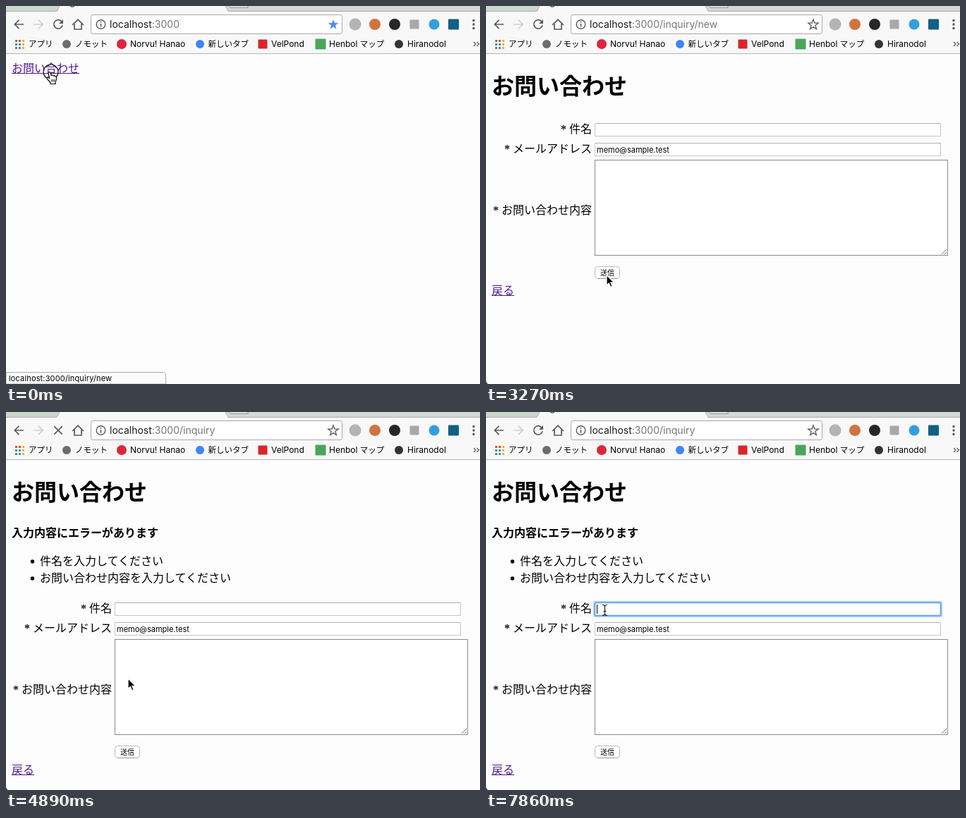
An HTML page that plays this animation: 672 px wide and 536 px high, repeating every 8 s.

```html
<!DOCTYPE html>
<html lang="ja">
<head>
<meta charset="utf-8">
<title>お問い合わせ</title>
<style>
html, body { margin: 0; width: 100%; height: 100%; overflow: hidden; background: #fdfdfd; }
svg { position: absolute; left: 0; top: 0; display: block; }
text { white-space: pre; }
.ui { font-family: Inter, Roboto, "Noto Sans CJK JP", "Noto Sans CJK", sans-serif; }
.url { font-size: 14px; fill: #757575; }
.mark { font-size: 12px; fill: #000; }
.kana { font-size: 11.5px; }
.small { font-size: 11px; fill: #000; }
.jp { font-family: "Noto Sans CJK JP", "Noto Sans CJK", sans-serif; font-size: 16px; }
.link { fill: #551a8b; }
.star { font-family: "Liberation Serif", serif; font-weight: bold; }
</style>
</head>
<body>
<svg width="672" height="536" viewBox="0 0 672 536">
  <rect width="672" height="536" fill="#fdfdfd"/>

  <!-- page: start -->
  <g id="home">
    <text class="jp link" x="8" y="94">お問い合わせ</text>
    <path d="M8 95.5H104" stroke="#551a8b"/>
  </g>

  <!-- page: form -->
  <g id="inquiry">
    <text class="jp" x="8" y="124.5" style="font-size:32px;font-weight:bold">お問い合わせ</text>
    <g id="errors">
      <text class="jp" x="8" y="177" font-weight="bold">入力内容にエラーがあります</text>
      <circle cx="37.5" cy="212" r="2.7"/><text class="jp" x="48" y="217">件名を入力してください</text>
      <circle cx="37.5" cy="236" r="2.7"/><text class="jp" x="48" y="241">お問い合わせ内容を入力してください</text>
    </g>
    <g id="form">
      <g id="labels"></g>
      <g fill="#fff" stroke="#c6c6c6">
        <rect x="154.5" y="166.5" width="490" height="18"/>
        <rect x="154.5" y="194.5" width="490" height="18"/>
        <rect x="154.5" y="218.5" width="500" height="135" stroke="#8c8c8c"/>
        <path d="M155 166.5H644M155 194.5H644" stroke="#b0b0b0"/>
        <path d="M646 352L653 345M650 352L653 349" stroke="#777" fill="none"/>
      </g>
      <text class="ui small" x="157" y="208">memo@sample.test</text>
      <rect x="154.5" y="369.5" width="35" height="17" rx="4" fill="#fff" stroke="#b8b8b8"/>
      <path d="M158 386.5H186" stroke="#999"/>
      <text class="jp" x="162" y="382" style="font-size:10px">送信</text>
      <text class="jp link" x="8" y="409">戻る</text>
      <path d="M8 410.5H40" stroke="#551a8b"/>
    </g>
    <g id="focus" fill="none">
      <rect x="153.5" y="269.5" width="492" height="20" rx="2" stroke="#a9cdfa" stroke-width="3"/>
      <rect x="154.5" y="270.5" width="490" height="18" rx="1" stroke="#5b9df2" stroke-width="1.6"/>
    </g>
    <rect id="caret" x="157" y="273" width="1" height="13"/>
  </g>

  <!-- browser frame -->
  <rect width="672" height="8" fill="#d3d7d5"/>
  <rect width="74" height="7" fill="#cbd8cd"/>
  <rect y="8" width="672" height="59" fill="#f8f8f8"/>
  <path d="M72 8L76 0H311L316 8Z" fill="#f8f8f8"/>
  <path d="M0 7.5H72L76 0M311 0L315 7.5H672" fill="none" stroke="#a9acaa"/>
  <path d="M316 0L318 2.5H343V0" fill="#d9dcda" stroke="#999"/>
  <path d="M0 67.5H672" stroke="#b5b5b5"/>
  <path id="title" d="M91 0Q94 2.6 97 0" fill="none" stroke="#444" stroke-width="1.2"/>

  <g fill="none" stroke="#5a5a5a" stroke-width="1.7">
    <path d="M25 26H12.5M18.5 19.8L12.3 26L18.5 32.2"/>
    <path d="M39 26H52M46 19.8L52.2 26L46 32.2" stroke="#cfcfcf"/>
    <g id="reload">
      <path d="M79 22.2A6.2 6.2 0 1 0 80.1 27.2"/>
      <path d="M81 19V25H75Z" fill="#5a5a5a" stroke="none"/>
    </g>
    <path id="stop" d="M68.3 20.3L79.7 31.7M79.7 20.3L68.3 31.7"/>
    <path d="M94 27L102 19.3L110 27M97 25V33H107V25"/>
  </g>

  <rect x="120.5" y="12.5" width="356" height="27" rx="3" fill="#fff" stroke="#a8a8a8"/>
  <circle cx="134.5" cy="26" r="6.3" fill="none" stroke="#5a5a5a" stroke-width="1.4"/>
  <path d="M134.5 25V29.7M134.5 22V23.7" stroke="#5a5a5a" stroke-width="1.6"/>
  <text class="ui url" x="147" y="31"><tspan fill="#1c1c1c">localhost</tspan><tspan>:3000</tspan><tspan id="path"></tspan></text>
  <path id="fav" stroke-width="1.3"/>

  <g id="tools"></g>
  <g fill="#5a5a5a">
    <circle cx="663" cy="20.5" r="1.7"/><circle cx="663" cy="26" r="1.7"/><circle cx="663" cy="31.5" r="1.7"/>
  </g>
  <path d="M663 51L666 54L663 57M667.5 51L670.5 54L667.5 57" fill="none" stroke="#555" stroke-width="1.2"/>

  <g id="grid"></g>
  <g class="ui mark">
    <text class="kana" x="32" y="58">アプリ</text>
    <text class="kana" x="98" y="58">ノモット</text>
    <text x="176" y="58">Norvu! Hanao</text>
    <text class="kana" x="286.5" y="58">新しいタブ</text>
    <text x="376" y="58">VelPond</text>
    <text x="458" y="58">Henbol <tspan class="kana">マップ</tspan></text>
    <text x="569" y="58">Hiranodol</text>
  </g>

  <path d="M0 532Q1 535 3 536H0Z" fill="#333"/>
  <g id="status">
    <path d="M0 519.5H223.5Q226.5 519.5 226.5 522.5V536H0Z" fill="#fbfbfb" stroke="#aaa"/>
    <text class="ui small" x="4" y="532" letter-spacing=".15">localhost:3000/inquiry/new</text>
  </g>

  <!-- pointer -->
  <g id="pointer">
    <circle id="ring" r="10.5" fill="none" stroke="#111" stroke-width="1.2"/>
    <g id="hand" fill="#fff" stroke="#000" stroke-width="1.2" stroke-linejoin="round">
      <path d="M-3.5 2Q-3.5 0-2 0Q-.7 0-.3 1.6L.5 5Q2.3 3.8 3.3 5.4Q5 4.4 5.8 6.2Q7.8 5.6 8 8Q8.2 11.5 6.6 14V17H-.6V15.2Q-2.5 12.5-5 10Q-6.2 8.2-4.8 7.5Q-3.5 7.2-2 9Z"/>
      <path d="M1.2 10.5V14M3.2 10.5V14M5.2 10.5V14" stroke-width=".9"/>
    </g>
    <path id="arrow" d="M0 0V14.5L3.3 11.5L5.7 17L8.2 16L5.8 10.6H10.5Z" stroke="#fff" stroke-width="1.2"/>
    <path id="beam" d="M-3.5-7.5Q0-7.5 0-5.5Q0-7.5 3.5-7.5M0-5.5V5.5M-2 1.5H2M-3.5 7.5Q0 7.5 0 5.5Q0 7.5 3.5 7.5" fill="none" stroke="#111" stroke-width="1.1"/>
  </g>
</svg>
<script>
const LOOP = 8000;
const $ = id => document.getElementById(id);

function add(parent, tag, attrs, text = "") {
  const el = document.createElementNS("http://www.w3.org/2000/svg", tag);
  for (const key in attrs) el.setAttribute(key, attrs[key]);
  el.textContent = text;
  $(parent).append(el);
}
const dot = (x, y, r, fill) => add("tools", "circle", { cx: x, cy: y, r, fill });
const box = (x, y, size, fill) =>
  add("tools", "rect", { x: x - size / 2, y: y - size / 2, width: size, height: size, rx: 1, fill });

// toolbar and bookmark icons
dot(495, 26, 8.5, "#b4b4b4");
dot(523, 26, 8, "#cf7440");
dot(551, 26, 8, "#272727");
box(579, 26, 13, "#a8a8a8");
dot(607, 26, 7.5, "#349fdd");
box(634.5, 26, 15, "#126086");
dot(86, 54, 6, "#6c6c6c");
dot(164, 54, 7, "#e0243a");
dot(275, 54, 6, "#4285f4");
box(364, 54, 13, "#d9252a");
box(446, 54, 15, "#4aa65a");
dot(557, 54, 6, "#333");

const gridColors = ["#e2483d", "#e2483d", "#f0b429", "#3f9d58", "#4285f4", "#f0b429", "#3f9d58", "#4285f4", "#f0b429"];
gridColors.forEach((fill, i) => add("grid", "rect", {
  x: 13 + i % 3 * 5, y: 48 + Math.floor(i / 3) * 5, width: 3, height: 3, fill
}));

// required-field labels, right-aligned at x = 150
[["件名", 180], ["メールアドレス", 208], ["お問い合わせ内容", 295]].forEach(([label, y]) => {
  const x = 150 - label.length * 16;
  add("labels", "text", { class: "jp", x, y }, label);
  add("labels", "text", { class: "jp star", x: x - 12, y, fill: "#0d1d3d" }, "*");
});

const starPoints = Array.from({ length: 10 }, (_, i) => {
  const r = i % 2 ? 3.1 : 7.6, a = i * Math.PI / 5;
  return [464 + r * Math.sin(a), 26.5 - r * Math.cos(a)].map(v => v.toFixed(2)).join(" ");
});
$("fav").setAttribute("d", "M" + starPoints.join("L") + "Z");

// time, pointer shape, x, y
const moves = [
  [0, "hand", 63.5, 93.5],
  [2670, "arrow", 84, 150],
  [2820, "arrow", 113, 225],
  [2970, "arrow", 140, 300],
  [3120, "arrow", 160, 355],
  [3270, "arrow", 171, 381.5],
  [3410, "arrow", 172, 380],
  [3560, "arrow", 173, 378],
  [5640, "beam", 172, 340],
  [5790, "beam", 169, 300],
  [5940, "beam", 166.5, 274],
  [6080, "beam", 166, 271],
  [6380, "beam", 168.5, 281]
];

// spans in which each part is visible
const spans = {
  home: [[0, 1330]],
  inquiry: [[1330, LOOP]],
  errors: [[4890, LOOP]],
  status: [[0, 1330]],
  ring: [[0, 150], [4160, 4310], [6830, 6980]],
  title: [[0, 150], [2080, 4310], [6830, LOOP]],
  reload: [[0, 150], [2670, 4310], [6830, LOOP]],
  stop: [[150, 2670], [4310, 6830]],
  focus: [[6830, LOOP]],
  caret: [[6830, 7270], [7860, LOOP]]
};

const show = (id, on) => $(id).style.display = on ? "" : "none";

function draw(t) {
  for (const id in spans) show(id, spans[id].some(([from, to]) => t >= from && t < to));

  $("path").textContent = t < 150 ? "" : t < 4310 ? "/inquiry/new" : "/inquiry";
  const saved = t < 150;
  $("fav").setAttribute("fill", saved ? "#4a8df5" : "none");
  $("fav").setAttribute("stroke", saved ? "none" : "#5a5a5a");
  $("form").setAttribute("transform", `translate(0 ${t < 4890 ? 0 : 104})`);

  const [, shape, x, y] = moves.findLast(move => move[0] <= t);
  for (const name of ["hand", "arrow", "beam"]) show(name, name === shape);
  $("pointer").setAttribute("transform", `translate(${x} ${y})`);
}

const start = performance.now();
function tick(now) {
  draw(Math.max(0, now - start) % LOOP);
  requestAnimationFrame(tick);
}
draw(0);
requestAnimationFrame(tick);
</script>
</body>
</html>
```
